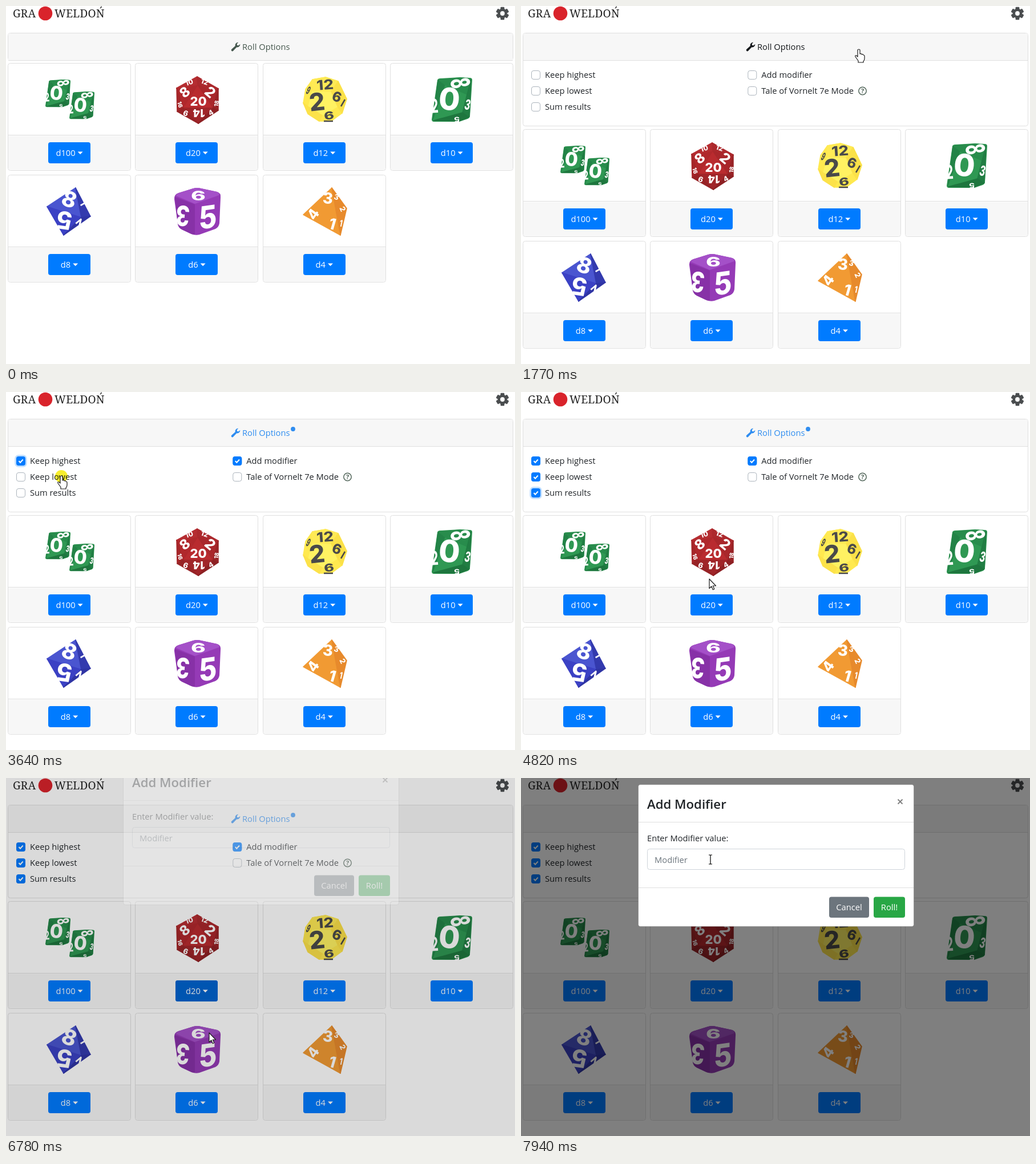
An HTML page that plays this animation: 892x628 px, repeating every 8 s.

```html
<!DOCTYPE html>
<html lang="en">
<head>
<meta charset="utf-8">
<title>Dice roller</title>
<style>
  html, body { margin: 0; width: 100%; height: 100%; overflow: hidden; background: #fff; }
  svg { display: block; }
  text { font: 14.7px "Open Sans", sans-serif; fill: #212529; white-space: pre; }
  polygon { stroke-width: 1.5; stroke-linejoin: round; }
  .white { fill: #fff; }
  .mid { text-anchor: middle; }
  .brand { font: 19px "Noto Serif", serif; fill: #222; letter-spacing: .3px; }
  .heading { font-size: 22.2px; font-weight: 600; }
  .num { font-family: Inter, sans-serif; font-weight: 800; text-anchor: middle; fill: inherit; }
  .line { fill: none; stroke: #dfdfdf; }
  #label text { fill: inherit; }
  #press { mix-blend-mode: multiply; }
</style>
</head>
<body>
<svg id="stage" width="892" height="628" viewBox="0 0 892 628"></svg>
<script>
const text = (s, x, y, cls = '') => `<text x="${x}" y="${y}" class="${cls}">${s}</text>`;
const rect = (x, y, w, h, fill, extra = '') =>
  `<rect x="${x}" y="${y}" width="${w}" height="${h}" fill="${fill}" ${extra}/>`;
const path = (d, fill, extra = '') => `<path d="${d}" fill="${fill}" ${extra}/>`;
const face = (points, fill) => `<polygon points="${points}" fill="${fill}" stroke="${fill}"/>`;
const group = (inner, attrs) => `<g ${attrs}>${inner}</g>`;
// A digit lying on a die face: turned, foreshortened and sheared
const num = (s, x, y, size, turn = 0, wide = 1, skew = 0) =>
  `<text class="num" style="font-size:${size}px" dy=".36em"
    transform="translate(${x} ${y}) rotate(${turn}) skewY(${skew}) scale(${wide} 1)">${s}</text>`;

// Dice
const d10 = (x, y, scale) => group(
  path('M10 5Q11 2 15 2L50 0 67 1Q71 1 71 5L67 68Q67 71 63 73L48 78 4 78Q0 78 0 74Z', '#2f9853') +
  face('11,5 23,13 2,74', '#238347') + face('12,4 50,1 69,3 62,30 23,13', '#288c4c') +
  face('69,4 66,69 54,62 62,30', '#217d43') + face('3,76 54,62 65,70 48,77', '#1e763e') +
  num(0, 31, 38, 54, 5) + num(8, 50, 10, 46, 80, .58) + num(2, 5, 50, 34, -4, .6) +
  num(3, 63, 48, 25, 14, .6) + num(5, 44, 74, 12, 176, 1.3),
  `transform="translate(${x} ${y}) scale(${scale})" fill="#fff"`);

const d20 = () => {
  const [top, ul, ll, bot, lr, ur] = ['335,124', '299,144', '300,185', '337,206', '372,183', '372,145'];
  const [t, l, r] = ['336,138', '310,179', '363,179'];
  const facets = [[t, l, r, '#b92b2f'], [t, l, ul, '#b0282c'], [t, r, ur, '#a9272b'], [l, r, bot, '#a02529'],
    [t, ul, top, '#b52d31'], [t, ur, top, '#ac292d'], [l, ul, ll, '#a52629'], [l, ll, bot, '#972326'],
    [r, ur, lr, '#982326'], [r, lr, bot, '#8d2023']];
  return facets.map(f => face(f.slice(0, 3).join(' '), f[3])).join('') +
    num(20, 337, 167, 22) + num(8, 313, 151, 24, -40) + num(2, 358, 151, 25, 40) + num(14, 338, 188, 19, 180) +
    num(10, 321, 134, 12, -18) + num(12, 348, 133, 12, 18) + num(16, 305, 173, 10, 75) +
    num(6, 315, 188, 13, 20) + num(18, 369, 171, 10, -80) + num(4, 359, 187, 12, -30);
};

const d12 = () =>
  face('537,129 560,125 582,132 597,163 589,188 570,202 549,202 529,189 521,170 525,146', '#ffe94f') +
  face('537,149 570,150 581,176 554,192 530,177', '#fff262') +
  face('537,129 560,125 582,132 570,150 537,149', '#ffea55') +
  face('582,132 597,163 589,188 581,176 570,150', '#fbe148') +
  face('530,177 554,192 549,202 529,189 521,170', '#fce24a') +
  num(12, 559, 138, 24, -4, 1.15) + num(2, 545, 168, 43, -6) + num(6, 580, 159, 24, 20) +
  num(6, 566, 192, 19, -8, 1.4) + num(9, 530, 148, 19, 25, .45) +
  path('M587 176L594 164M557 202L573 202', 'none', 'stroke="#4a4a4a" stroke-width="2.5"');

const d8 = () =>
  face('122,319 72,352 132,371', '#4a55d0') + face('72,352 132,371 101,402', '#3b41c4') +
  face('122,319 148,369 132,371', '#333aae') + face('132,371 148,369 101,402', '#2f34a4') +
  num(8, 111, 339, 38, 20) + num(5, 102, 376, 43, 188) + num(2, 131, 382, 20, 140, 1.2) + num(1, 135, 346, 16, 60);

const d6 = () =>
  path('M295 339Q294 331 302 328L328 320Q335 318 342 320L370 326Q377 328 376 336L374 381Q373 388 367 391L339 401Q332 403 325 400L308 392Q302 389 301 382Z', '#953ab6') +
  path('M298 333Q298 330 303 328L328 320Q335 318 342 320L370 326Q375 328 373 332L331 347Z', '#a450c8') +
  path('M296 335L331 348V401Q328 401 325 400L308 392Q302 389 301 382Z', '#8731a7') +
  num(6, 337, 333, 23, 0, 1.7) + num(3, 310, 368, 49, 184, .75) + num(5, 354, 370, 55, 0, .88, -8);

const d4 = () =>
  face('571,319 586,402 521,366', '#f19a33') + face('571,319 597,355 586,402', '#e78a2c') +
  num(3, 564, 337, 27, 6) + num(4, 538, 365, 25, -55) + num(1, 572, 382, 27, 16) +
  num(3, 579, 335, 13, 20) + num(2, 590, 356, 13, 65) + num(1, 587, 381, 16, 12, .7);

const dice = {
  d100: () => d10(69, 129, .62) + d10(111, 150, .62), d20, d12,
  d10: () => d10(746, 125, 1), d8, d6, d4
};

// Page parts
function card(name, i) {
  const col = i % 4, x = Math.round(3 + 223.3 * col) + .5, y = i < 4 ? 100.5 : 296.5;
  const mid = 111 + 223.4 * col, textWidth = 9 + 8.4 * (name.length - 1);
  const left = mid - (textWidth + 13) / 2, caret = left + textWidth + 4;
  const button = Math.floor(mid - 36.7);
  return rect(x, y, 215, 188, '#fff', 'rx="4" stroke="#dfdfdf"') +
    path(`M${x + .5} ${y + 127}h214v57q0 3-3 3h-208q-3 0-3-3z`, '#f7f7f7') +
    path(`M${x} ${y + 126}h215`, 'none', 'class="line"') +
    group(dice[name](), `fill="${name === 'd12' ? '#4a4a4a' : '#fff'}"`) +
    (name === 'd20' ? rect(button - 1.5, y + 137, 77, 40, 'none',
      'id="ring" rx="5" stroke="#268fff" stroke-opacity=".5" stroke-width="3"') : '') +
    rect(button, y + 138.5, 74, 37, '#007bff', 'rx="4"') +
    (name === 'd20' ? rect(button, y + 138.5, 74, 37, '#0062cc', 'id="dark" rx="4"') : '') +
    text(name, left, y + 162.5, 'white') + path(`M${caret} ${y + 155}h9l-4.5 4.8z`, '#fff');
}

// label, x, y, time checked, time the focus ring leaves
const options = [
  ['Keep highest', 26, 121, 3350, 3720], ['Keep lowest', 26, 149, 3720, 4200], ['Sum results', 26, 177, 4200, 5520],
  ['Add modifier', 405.3, 121, 2550, 3350], ['Tale of Vornelt 7e Mode', 405.3, 149, 1e9, 1e9]
];
const checkbox = ([label, x, y], i) =>
  rect(x - 9.2, y - 9.2, 18.4, 18.4, 'none', `id="focus${i}" rx="5" stroke="#bfdeff" stroke-width="3"`) +
  rect(x - 7.5, y - 7.5, 15, 15, '#fff', 'rx="3.5" stroke="#adb5bd"') +
  group(rect(x - 8, y - 8, 16, 16, '#007bff', 'rx="4"') +
    path(`M${x - 3.5} ${y}l2.5 2.7 4.7-5.2`, 'none', 'stroke="#fff" stroke-width="2"'), `id="check${i}"`) +
  text(label, x + 16, y + 5);

const header =
  text('GRA', 12, 20, 'brand') + text('WELDOŃ', 85, 20, 'brand') + '<circle cx="69" cy="13" r="12.3" fill="#d9232b"/>' +
  group([0, 60, 120].map(a => rect(-3.4, -11.3, 6.8, 22.6, '#4a4d4f', `rx="1.2" transform="rotate(${a})"`)).join('') +
    '<circle r="8.4" fill="#4a4d4f"/><circle r="3.9" fill="#fff"/>', 'transform="translate(870 13)"');

const wrench = path('M15.8 3.4L13 5.8 10.6 5.4 10.2 3 12.6.2A5 5 0 0 0 7.3 6.4L.6 12.6A2 2 0 0 0 3.4 15.4L9.8 8.8A5 5 0 0 0 15.8 3.4Z',
  'inherit', 'style="fill:inherit" transform="translate(394.5 63.5)"');

const menu = rect(298.5, 394.5, 152.5, 170, '#fff', 'rx="4" stroke="#ccc"') +
  [1, 2, 3, 4, 5].map(n => text(`Roll <tspan font-weight="700">${n}</tspan> ${n > 1 ? 'dice' : 'die'}`,
    321, 392.5 + 30.8 * n)).join('');

const modal = rect(205.5, 11.5, 483, 249, '#fff', 'rx="4" stroke="#000" stroke-opacity=".2"') +
  text('Add Modifier', 221, 54, 'heading') +
  path('M660.5 37.5l8 8m0-8l-8 8', 'none', 'stroke="#7f7f7f" stroke-width="1.8"') +
  path('M206 77.5h482M206 192.5h482', 'none', 'class="line"') +
  text('Enter Modifier value:', 221, 111) +
  rect(221.5, 124.5, 451, 36, '#fff', 'rx="4" stroke="#ced4da"') +
  '<text x="234" y="149" style="fill:#6c757d">Modifier</text>' +
  rect(540, 208.5, 70, 36.5, '#6c757d', 'rx="4"') + text('Cancel', 575, 232, 'white mid') +
  rect(618, 208.5, 55, 36.5, '#28a745', 'rx="4"') + text('Roll!', 645.5, 232, 'white mid');

const outline = 'stroke="#1c1c1c" stroke-width="1.2" stroke-linejoin="round"';
const pointers = {
  arrow: path('M0 0V16.5L3.8 13 6.3 18.8 8.8 17.7 6.3 12H11.5Z', '#fff', outline),
  hand: path('M-2 1q0-2 2-2t2 2V7q3-1 3 1 3-1 3 1 2 0 2 2v4q0 3-2 5v2H-1v-3L-6 12q-1-3 2-2l2 2z', '#fff', outline),
  beam: path('M-3-8h2q1 0 1 1 0-1 1-1h2M0-7V7M-3 8h2q1 0 1-1 0 1 1 1h2', 'none', 'stroke="#000" stroke-width="1.2"')
};

const stage = document.getElementById('stage');
stage.innerHTML = rect(0, 0, 892, 628, '#fff') + header +
  rect(3.5, 47.5, 885, 48, '#fff', 'id="box" rx="4" stroke="#dfdfdf"') +
  path('M4 95V51q0-3 3-3h878q3 0 3 3v44z', '#f7f7f7') + path('M4 95.5h884', 'none', 'class="line"') +
  group(wrench + text('Roll Options', 414, 77), 'id="label"') +
  '<circle id="dot" cx="503" cy="65" r="3.9" fill="#2f8df0"/>' +
  `<svg id="panel" width="892" height="95">${options.map(checkbox).join('')}
    <circle cx="598.5" cy="149" r="6.7" fill="none" stroke="#52665a" stroke-width="1.5"/>
    <text x="598.5" y="153" class="mid" style="font-size:11px;font-weight:700;fill:#52665a">?</text></svg>` +
  group(Object.keys(dice).map(card).join(''), 'id="cards"') + group(menu, 'id="menu"') +
  rect(0, 0, 892, 628, '#000', 'id="backdrop"') + group(modal, 'id="modal"') +
  '<circle id="press" r="11" fill="#f7ee2e"/>' +
  group(Object.entries(pointers).map(([k, p]) => group(p, `id="${k}"`)).join(''), 'id="cursor"');

const part = Object.fromEntries([...stage.querySelectorAll('[id]')].map(el => [el.id, el]));

// Motion
const ramp = (t, start, length) => Math.min(1, Math.max(0, (t - start) / length));
const smooth = u => u * u * (3 - 2 * u);
const show = (id, on) => part[id].setAttribute('visibility', on ? 'visible' : 'hidden');
const within = (t, a, b) => t >= a && t < b;

function bezier(x1, y1, x2, y2, x) {
  const at = (a, b, s) => 3 * a * s * (1 - s) ** 2 + 3 * b * s * s * (1 - s) + s ** 3;
  let low = 0, high = 1;
  for (let i = 0; i < 24; i++) {
    const s = (low + high) / 2;
    if (at(x1, x2, s) < x) low = s; else high = s;
  }
  return at(y1, y2, low);
}

// start, end, x, y, optional bend
const moves = [
  [370, 1130, 592, 77, 655, 125], [1900, 2200, 457, 114], [2600, 3230, 97, 122], [3390, 3600, 97, 148],
  [3760, 4010, 97, 174], [4220, 4980, 357, 347, 240, 262], [5000, 5360, 357, 376], [5755, 6460, 356, 447],
  [7340, 7930, 332, 143]
];
function cursorAt(t) {
  let x = 804, y = 594;
  for (const [start, end, tx, ty, bx = (x + tx) / 2, by = (y + ty) / 2] of moves) {
    if (t < start) break;
    const u = smooth(ramp(t, start, end - start)), v = 1 - u;
    x = v * v * x + 2 * u * v * bx + u * u * tx;
    y = v * v * y + 2 * u * v * by + u * u * ty;
  }
  return [x, y];
}
const kinds = [[0, 'arrow'], [1020, 'hand'], [2640, 'arrow'], [3100, 'hand'], [4300, 'arrow'],
  [5050, 'hand'], [6620, 'arrow'], [7830, 'beam']];
const presses = [[2470, 2590], [3260, 3380], [3570, 3710], [4050, 4180], [5520, 5640]];

function draw(t) {
  const open = Math.round(116 * bezier(.25, .1, .25, 1, ramp(t, 1428, 340)));
  part.box.setAttribute('height', 48 + Math.max(0, open - 1));
  part.panel.setAttribute('height', 95 + open);
  part.cards.setAttribute('transform', `translate(0 ${open})`);

  const hover = ramp(t, 1050, 220) - ramp(t, 1960, 180);
  part.label.style.fill = t >= 2550 ? '#2f8df0' : `color-mix(in srgb, #16191c ${hover * 100}%, #46584e)`;
  show('dot', t >= 2550);
  options.forEach(([, , , on, blur], i) => {
    show('check' + i, t >= on);
    show('focus' + i, within(t, on, blur));
  });

  show('menu', within(t, 5600, 6620));
  show('ring', within(t, 5520, 6620));
  part.dark.setAttribute('opacity', t < 5520 ? .6 * ramp(t, 5050, 150) : 1 - ramp(t, 6770, 150));

  const fade = ramp(t, 6737, 150);
  part.backdrop.setAttribute('opacity', fade / 2);
  part.modal.setAttribute('opacity', fade);
  const drop = Math.round(50 * bezier(0, 0, .58, 1, ramp(t, 6737, 300)) - 50);
  part.modal.setAttribute('transform', `translate(0 ${drop})`);

  const place = `translate(${cursorAt(t).map(Math.round).join(' ')})`;
  part.cursor.setAttribute('transform', place);
  part.press.setAttribute('transform', place);
  show('press', presses.some(([a, b]) => within(t, a, b)));
  const kind = kinds.filter(k => t >= k[0]).pop()[1];
  for (const k in pointers) show(k, k === kind && t >= 370);
}

function tick() {
  draw(performance.now() % 8000);
  requestAnimationFrame(tick);
}
tick();
</script>
</body>
</html>
```
